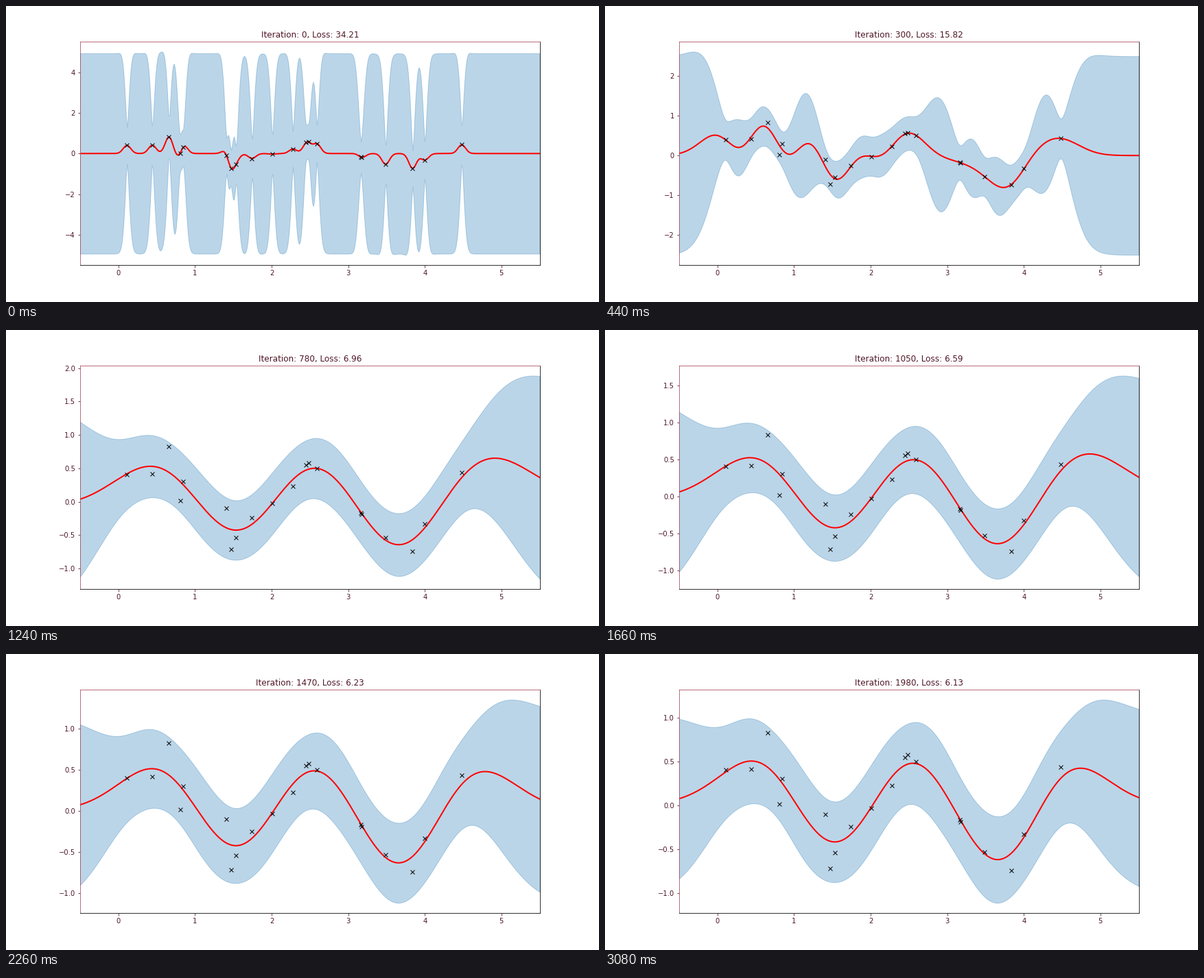
Recreate the animation shown at these times as a matplotlib script. Size 864 by 432 pixels, loop 3.1 s.

```python
import numpy as np
import matplotlib.pyplot as plt
from matplotlib.animation import FuncAnimation

plt.rcParams["font.family"] = "DejaVu Sans"

POINTS = 20
STRIDE, LAST = 30, 1980   # training iterations per picture, final iteration
TICK, LOOP = 20, 3100     # ms
INK, RIM = "#4f1626", "#a8485a"


def box_muller(u):
    """Turn 16 uniform numbers into 16 normal ones."""
    radius = np.sqrt(-2 * np.log(1 - u[:8]))
    angle = 2 * np.pi * u[8:]
    return np.r_[radius * np.cos(angle), radius * np.sin(angle)]


def make_data():
    """Noisy samples of a sine at random places."""
    raw = np.random.RandomState(0).randint(0, 2**32, 56, dtype=np.uint32)
    u = (raw & 0xFFFFFF) / 2**24
    x = 5 * u[:POINTS]
    # normals come in blocks of 16; the last block overlaps the first
    noise = np.r_[box_muller(u[20:36])[:POINTS - 16], box_muller(u[40:56])]
    return x, .5 * np.sin(3 * x) + .2 * noise


def sq_dist(a, b):
    return (a[:, None] - b[None, :]) ** 2


X, Y = make_data()
GRID = np.linspace(-.5, 5.5, 500)
D2, D2_GRID = sq_dist(X, X), sq_dist(X, GRID)
EYE = np.eye(POINTS)


def loss_and_grad(theta):
    """Negative log marginal likelihood; theta = log(length, variance, noise)."""
    length, var, noise = np.exp(theta)
    signal = var * np.exp(-.5 * D2 / length**2)
    K = signal + noise * EYE
    inv = np.linalg.inv(K)
    alpha = inv @ Y
    loss = .5 * (Y @ alpha + np.linalg.slogdet(K)[1] + POINTS * np.log(2 * np.pi))
    inner = inv - np.outer(alpha, alpha)
    grad = [.5 * np.sum(inner * dK)
            for dK in (signal * D2 / length**2, signal, noise * EYE)]
    return loss, np.array(grad)


def train(lr=.005, b1=.9, b2=.999):
    """Adam descent, keeping every STRIDE-th state."""
    theta = np.log([.05, 6.0, .1])
    m, v, log = np.zeros(3), np.zeros(3), []
    for i in range(LAST + 1):
        loss, g = loss_and_grad(theta)
        if i % STRIDE == 0:
            log.append((i, loss, theta.copy()))
        m = b1 * m + (1 - b1) * g
        v = b2 * v + (1 - b2) * g * g
        theta -= lr * (m / (1 - b1**(i + 1))) / (np.sqrt(v / (1 - b2**(i + 1))) + 1e-8)
    return log


def predict(theta):
    """Mean and two standard deviations along the grid."""
    length, var, noise = np.exp(theta)
    K = var * np.exp(-.5 * D2 / length**2) + noise * EYE
    k = var * np.exp(-.5 * D2_GRID / length**2)
    w = np.linalg.solve(K, k)
    sd = np.sqrt(var + noise - np.sum(k * w, axis=0))
    return Y @ w, 2 * sd


HISTORY = train()

fig, ax = plt.subplots(figsize=(12, 6), dpi=72)
fig.subplots_adjust(left=.125, right=.9, bottom=.125, top=.88)
ax.set_xlim(-.5, 5.5)
ax.tick_params(color=INK, labelcolor=INK)
for side in ("left", "top"):
    ax.spines[side].set_color(RIM)

band = ax.fill_between(GRID, GRID, GRID, color="C0", alpha=.3)
mean_line, = ax.plot([], [], "r", lw=2)
ax.plot(X, Y, "kx", ms=6)
title = ax.set_title("", fontsize=12, color=INK)


def picture_at(tick):
    """Pictures come in threes, held 1, 5 and 1 ticks."""
    group, phase = divmod(tick, 7)
    return 3 * group + (phase > 0) + (phase > 5)


def update(tick):
    i, loss, theta = HISTORY[picture_at(tick)]
    mu, half = predict(theta)
    lo, hi = mu - half, mu + half
    mean_line.set_data(GRID, mu)
    band.set_verts([np.column_stack([np.r_[GRID, GRID[::-1]], np.r_[hi, lo[::-1]]])])
    pad = .05 * (hi.max() - lo.min())
    ax.set_ylim(lo.min() - pad, hi.max() + pad)
    title.set_text(f"Iteration: {i}, Loss: {loss:.2f}")
    return band, mean_line, title


anim = FuncAnimation(fig, update, frames=LOOP // TICK, interval=TICK,
                     repeat=True, repeat_delay=0)
plt.show()
```
